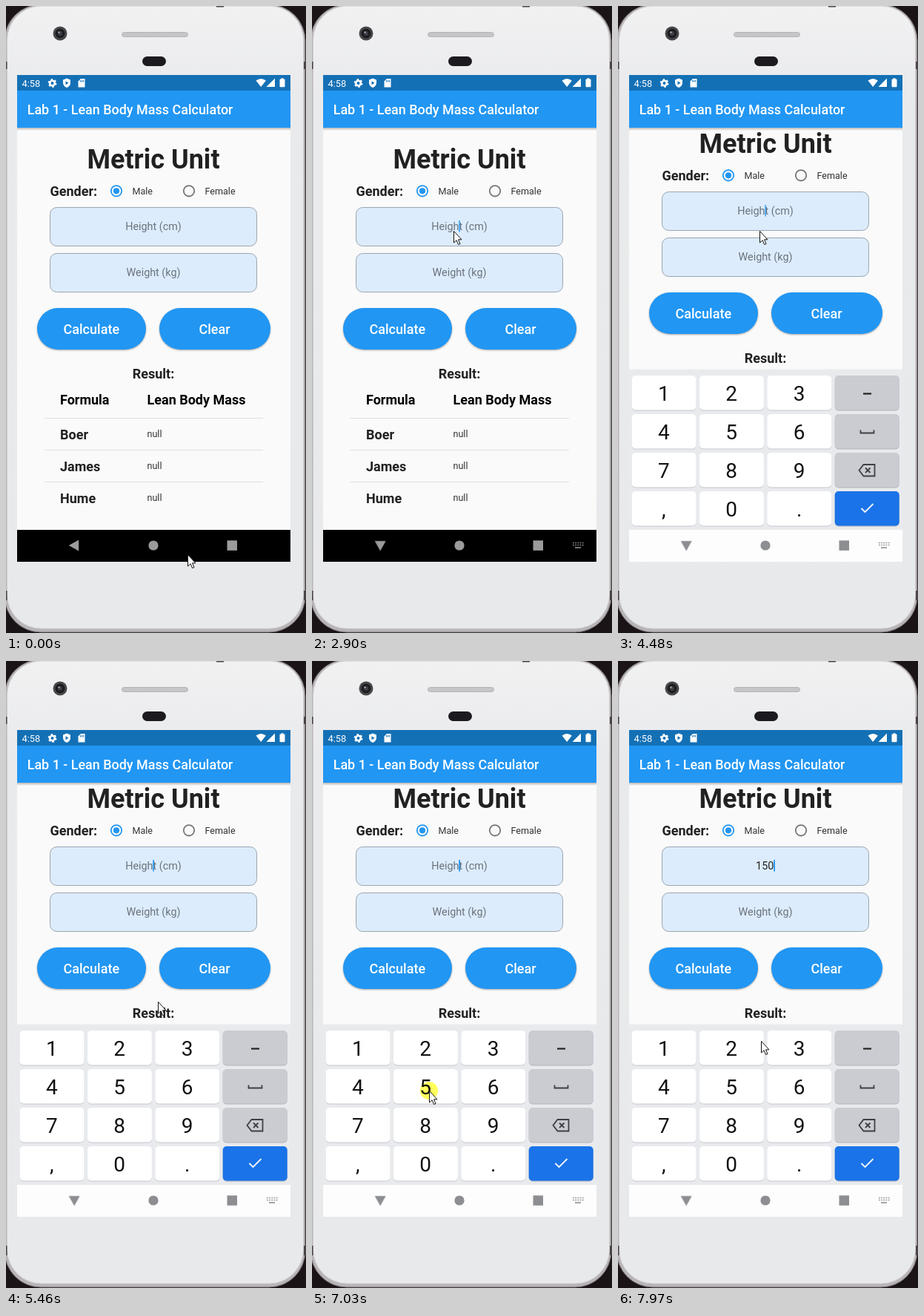
An HTML page that plays this animation: 405 by 845 pixels, repeating every 7990 ms.

```html
<!DOCTYPE html>
<html lang="en">
<head>
<meta charset="utf-8">
<title>Lean Body Mass Calculator</title>
<style>
html, body { margin: 0; width: 100%; height: 100%; overflow: hidden; background: #1b1416; }
svg { display: block; width: 405px; height: 845px; font-family: Roboto, sans-serif; }
text { fill: #212121; }
.mid { text-anchor: middle; }
.h1 { font-size: 36px; font-weight: 700; }
.h2 { font-size: 18px; font-weight: 700; }
.btn { font-size: 18px; font-weight: 500; fill: #fff; text-anchor: middle; }
.small { font-size: 12.57px; fill: #333; }
.field { fill: #dcecfd; stroke: #9ba5af; }
.hint { font-size: 14.37px; fill: #6b737b; text-anchor: middle; }
.typed { font-size: 14.37px; text-anchor: middle; opacity: 0; }
.head { fill: #000; }
.digit { font-size: 28px; fill: #111; text-anchor: middle; }
.icon { fill: none; stroke: #3c4043; stroke-width: 1.8; }
.pill { fill: #2196f3; filter: drop-shadow(0 1.5px 1.2px #0005); }

/* every track runs on the same 7.99 s clock */
.step { animation: 7.99s step-end infinite; }
#page { animation-name: scroll; }
#kb { animation-name: kb; }
#nav { animation-name: nav; }
#navIcons { animation-name: navIcons; }
#ime { animation-name: ime; }
#caret { animation-name: blink, caretX; animation-duration: 7.99s; animation-timing-function: step-end; animation-iteration-count: infinite; }
#hint { animation-name: hint; }
#t1 { animation-name: t1; }
#t2 { animation-name: t2; }
#t3 { animation-name: t3; }
#back { transform-origin: 92.2px 727px; animation: turn 7.99s linear infinite; }
#cursor { animation: move 7.99s linear infinite; }
#tap { mix-blend-mode: multiply; animation: move 7.99s linear infinite, tap 7.99s step-end infinite; }
.press { animation: press 7.99s step-end infinite; }

@keyframes scroll { 0% { transform: none } 46.92% { transform: translateY(-10px) } 47.3%, 100% { transform: translateY(-21px) } }
@keyframes kb { 0% { opacity: 0 } 44.92%, 100% { opacity: 1 } }
@keyframes nav { 0% { fill: #000 } 44.92%, 100% { fill: #fdfdfe } }
@keyframes navIcons { 0% { fill: #9b9b9b } 44.92%, 100% { fill: #8d8e92 } }
@keyframes ime { 0% { opacity: 0 } 26.15%, 100% { opacity: 1 } }
@keyframes turn { 0%, 32.6% { transform: none } 35.1%, 100% { transform: rotate(-90deg) } }
@keyframes blink {
  0% { opacity: 0 } 28.79% { opacity: .75 } 37.92% { opacity: 0 } 41.8% { opacity: .75 }
  49.68% { opacity: 0 } 56.05% { opacity: .75 } 61.69% { opacity: 0 } 67.96% { opacity: .9 }
  74.22% { opacity: 0 } 80.1%, 100% { opacity: 1 }
}
@keyframes caretX {
  0% { transform: none } 92.1% { transform: translateX(4px) }
  93.48% { transform: translateX(8px) } 96.37%, 100% { transform: translateX(12px) }
}
@keyframes hint { 0% { opacity: 1 } 92.1% { opacity: .5 } 92.5%, 100% { opacity: 0 } }
@keyframes t1 { 0% { opacity: 0 } 92.1% { opacity: 1 } 93.48%, 100% { opacity: 0 } }
@keyframes t2 { 0% { opacity: 0 } 93.48% { opacity: 1 } 96.37%, 100% { opacity: 0 } }
@keyframes t3 { 0% { opacity: 0 } 96.37%, 100% { opacity: 1 } }
@keyframes press { 0% { fill: #dfe1e5 } 1.2%, 100% { fill: #fff } }
@keyframes tap {
  0% { opacity: 0 } 12.51% { opacity: 1 } 13.88% { opacity: 0 } 82.34% { opacity: 1 } 83.8% { opacity: 0 }
  87.9% { opacity: 1 } 88.98% { opacity: 0 } 93.48% { opacity: 1 } 95.48%, 100% { opacity: 0 }
}
@keyframes move {
  0%, .25% { transform: translate(245px, 739px) }
  2.5% { transform: translate(220px, 640px) }
  4.8% { transform: translate(185px, 525px) }
  6.2% { transform: translate(180px, 455px) }
  7.7% { transform: translate(192px, 390px) }
  9.76% { transform: translate(221px, 308px) }
  10.51%, 26.1% { transform: translate(223px, 297px) }
  29.66%, 64.58% { transform: translate(191px, 303px) }
  66.3% { transform: translate(189px, 370px) }
  68.34%, 70.2% { transform: translate(205px, 459px) }
  73% { transform: translate(160px, 495px) }
  76% { transform: translate(85px, 530px) }
  78.3%, 79.1% { transform: translate(58px, 541px) }
  80.1%, 84.1% { transform: translate(57px, 541px) }
  86.2% { transform: translate(112px, 565px) }
  87.86%, 88.99% { transform: translate(158px, 579px) }
  92.12%, 92.49% { transform: translate(169px, 651px) }
  93.49%, 95.6% { transform: translate(175px, 674px) }
  97.6% { transform: translate(181px, 590px) }
  99.6%, 100% { transform: translate(193px, 512px) }
}
</style>
</head>
<body>
<svg viewBox="0 0 405 845">
  <defs>
    <linearGradient id="shell" x2="0" y2="1">
      <stop stop-color="#f1f1f2"/><stop offset=".15" stop-color="#e9eaec"/><stop offset="1" stop-color="#e8e9eb"/>
    </linearGradient>
    <linearGradient id="shade" x2="0" y2="1">
      <stop stop-color="#0004"/><stop offset="1" stop-color="#0000"/>
    </linearGradient>
    <clipPath id="screen"><path d="M15 93h369v656H15z"/></clipPath>
  </defs>

  <!-- phone -->
  <rect x="-2" y="-2" width="406" height="846" rx="49" fill="#b8b4b7" stroke="#6d686b"/>
  <rect x="1.5" y="0" width="400" height="839" rx="46" fill="url(#shell)" stroke="#d2d0d2"/>
  <path d="M0 75h1.5v10H0zM402 75h3v10h-3zM0 788h1.5v13H0zM402 788h3v13h-3zM284 0h10v1.5h-10z" fill="#4a4548"/>
  <circle cx="73" cy="37" r="9.5" fill="#48484b"/>
  <circle cx="73" cy="37" r="6.5" fill="#1d1d20"/>
  <circle cx="73" cy="37" r="3" fill="#3d4048"/>
  <circle cx="71.5" cy="35.5" r="1.2" fill="#a5a8ae"/>
  <rect x="156.5" y="35.5" width="89" height="6" rx="3" fill="#c6c6c8" stroke="#b4b4b6"/>
  <rect x="184" y="68" width="32" height="13" rx="6.5" fill="#1c1a1e"/>

  <g clip-path="url(#screen)">
    <path d="M15 93h369v656H15z" fill="#fafafa"/>
    <g id="page" class="step">
      <text class="h1 mid" x="199" y="219">Metric Unit</text>
      <text class="h2" x="59.5" y="256">Gender:</text>
      <g fill="none" stroke-width="1.8">
        <circle cx="149" cy="249.3" r="7.2" stroke="#2196f3"/>
        <circle cx="247" cy="249.3" r="7.2" stroke="#757575"/>
      </g>
      <circle cx="149" cy="249.3" r="4.1" fill="#2196f3"/>
      <text class="small" x="170.5" y="254">Male</text>
      <text class="small" x="268.5" y="254">Female</text>
      <rect class="field" x="59.5" y="271.5" width="279" height="52" rx="9"/>
      <rect class="field" x="59.5" y="333.5" width="279" height="52" rx="9"/>
      <text id="hint" class="hint step" x="199" y="301.5">Height (cm)</text>
      <text id="t1" class="typed step" x="198.5" y="301.5">1</text>
      <text id="t2" class="typed step" x="198.5" y="301.5">15</text>
      <text id="t3" class="typed step" x="198.2" y="301.5">150</text>
      <rect id="caret" x="198.2" y="289" width="1.8" height="15.5" fill="#2196f3"/>
      <text class="hint" x="199" y="363.5">Weight (kg)</text>
      <rect class="pill" x="42" y="407" width="147" height="56" rx="28"/>
      <rect class="pill" x="207" y="407" width="150" height="56" rx="28"/>
      <text class="btn" x="115.3" y="441.5">Calculate</text>
      <text class="btn" x="281.5" y="441.5">Clear</text>
      <text class="h2 mid" x="199" y="501.5">Result:</text>
      <text class="h2 head" x="73" y="537">Formula</text>
      <text class="h2 head" x="190.5" y="537">Lean Body Mass</text>
      <path d="M52 555.5h295M52 598.5h295M52 641.5h295" stroke="#dedede"/>
      <text class="h2" x="73" y="583.5">Boer</text>
      <text class="h2" x="73" y="626.5">James</text>
      <text class="h2" x="73" y="669.5">Hume</text>
      <text class="small" x="190.5" y="581">null</text>
      <text class="small" x="190.5" y="624">null</text>
      <text class="small" x="190.5" y="667">null</text>
    </g>

    <!-- app bar and status bar -->
    <path d="M15 164h369v4H15z" fill="url(#shade)"/>
    <path d="M15 114h369v50H15z" fill="#2196f3"/>
    <path d="M15 93h369v21H15z" fill="#1470b5"/>
    <text x="28.7" y="146" font-size="17.96" font-weight="500" style="fill:#fff">Lab 1 - Lean Body Mass Calculator</text>
    <text x="21.5" y="108.5" font-size="12.8" style="fill:#fff">4:58</text>
    <g fill="#fff">
      <circle cx="62.5" cy="104" r="3.3" fill="none" stroke="#fff" stroke-width="2.6"/>
      <circle cx="62.5" cy="104" r="5" fill="none" stroke="#fff" stroke-width="1.8" stroke-dasharray="2.6 2.636"/>
      <path d="M82 97.5l5 2v4c0 3-2 5.300-5 6.500c-3-1.200-5-3.500-5-6.500v-4z"/>
      <path d="M80.500 101.200l4 2.500-4 2.500z" fill="#1470b5"/>
      <path d="M101 98h5.500v11.500h-9v-8z"/>
      <path d="M100.500 100v2.500M102.500 100v2.500M104.500 100v2.500" stroke="#1470b5"/>
      <path d="M337.500 100.500q6.700-5 13.400 0l-6.700 8.500z"/>
      <path d="M363 97.500V109h-11.500z"/>
      <rect x="369.500" y="98.500" width="7" height="10.800" rx="1"/><path d="M371.500 97.300h3v2h-3z"/>
    </g>

    <!-- keyboard -->
    <g id="kb" class="step" opacity="0">
      <path d="M15 491h369v216H15z" fill="#e8eaed"/>
      <path d="M15 490.500h369" stroke="#ececee" stroke-width="2"/>
      <g id="keys"></g>
      <path d="M331 522.500h11" stroke="#222" stroke-width="2.200"/>
      <path class="icon" d="M327.500 571.500v4h18v-4"/>
      <path class="icon" d="M331.500 618h15v15.500h-15l-6-7.750zM334 622.500l6.500 6.500m0-6.500l-6.500 6.500"/>
      <path class="icon" style="stroke:#fff" d="M328.500 677l5 5 11-11"/>
    </g>

    <!-- navigation bar -->
    <path id="nav" class="step" d="M15 706h369v43H15z"/>
    <g id="navIcons" class="step">
      <path id="back" d="M84.800 727l13.400-7.500v15z"/>
      <circle cx="199" cy="727" r="6.600"/>
      <path d="M298.500 720.300h13.500v13.500h-13.500z"/>
      <g id="ime" class="step" opacity="0" stroke="#8d8e92" fill="none" stroke-width="1.600">
        <path d="M352 723.500h15M352 726.500h15" stroke-dasharray="1.700 1.500"/>
        <path d="M355 730h8"/>
      </g>
    </g>
  </g>

  <circle id="tap" r="12" fill="#ffff5c" opacity="0"/>
  <path id="cursor" d="M.5.500v15.500l3.600-3.300 2.500 5.800 2.400-1-2.500-5.700h4.500z" fill="#fff" stroke="#111"/>
</svg>
<script>
const keys = document.getElementById('keys');
const rows = ['123-', '456 ', '789<', ',0.!'];
const pressAt = { 1: 7120, 5: 7230, 0: 7640 };

function add(tag, attrs, text = '') {
  const el = document.createElementNS('http://www.w3.org/2000/svg', tag);
  for (const name in attrs) el.setAttribute(name, attrs[name]);
  el.textContent = text;
  keys.append(el);
  return el;
}

rows.forEach((row, r) => [...row].forEach((label, c) => {
  const x = 18.5 + c * 91.4, y = 498 + r * 52;
  const fill = c < 3 ? '#fff' : r < 3 ? '#cbccd2' : '#1a73e8';
  const box = { x, y, width: 87, height: 46.5, rx: 5 };
  add('rect', { ...box, y: y + 1, fill: c < 3 ? '#c6c8cc' : '#b4b6bc' });
  const key = add('rect', { ...box, fill });
  if (label in pressAt) {
    key.classList.add('press');
    key.style.animationDelay = pressAt[label] + 'ms';
  }
  if (c < 3) add('text', { class: 'digit', x: x + 43.3, y: y + 34 }, label);
}));
</script>
</body>
</html>
```
